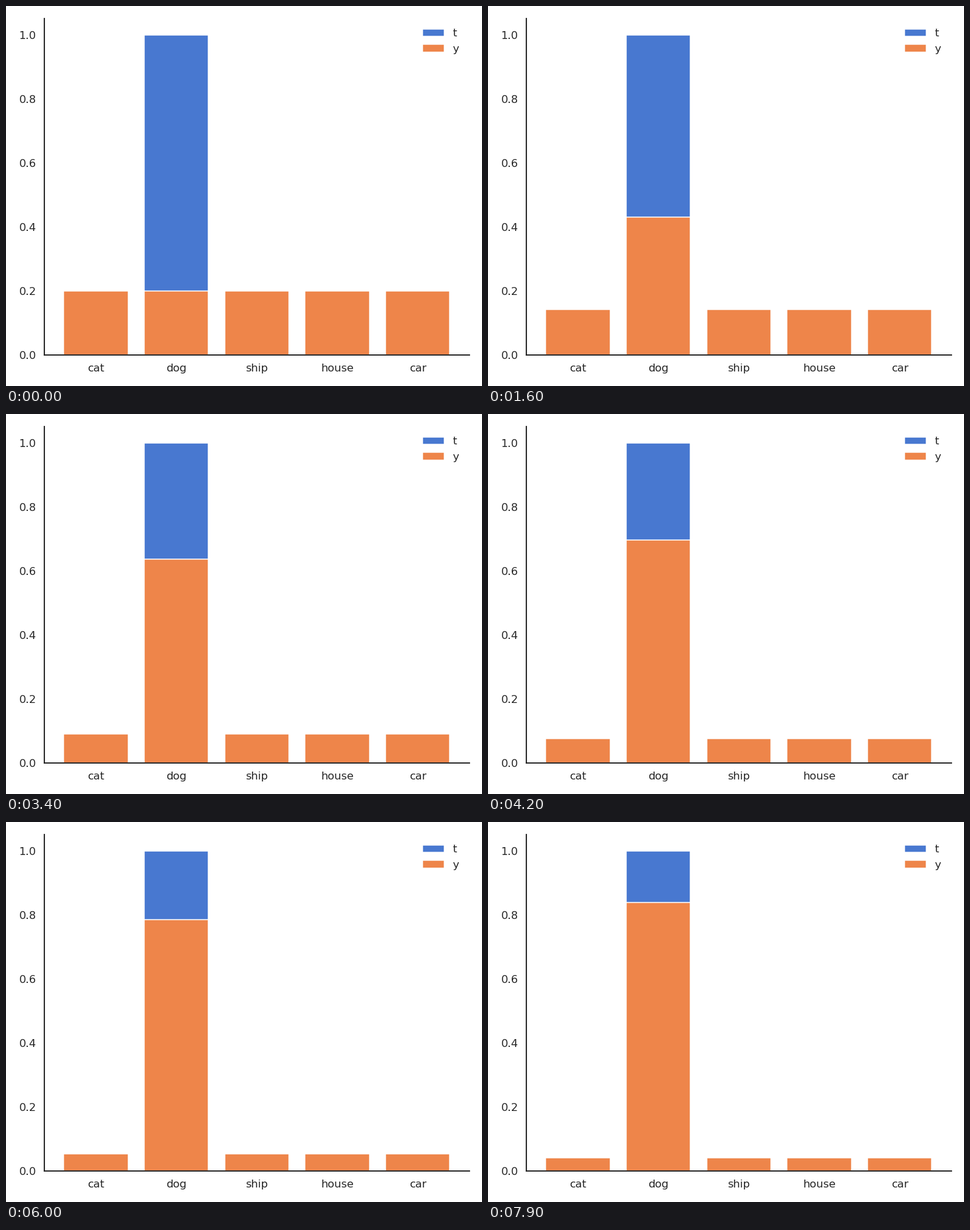
Recreate the animation shown at these times as a matplotlib script. Size 720 px wide and 576 px high, loop 8 s.

```python
import numpy as np
import matplotlib.pyplot as plt
from matplotlib.animation import FuncAnimation

FRAMES = 80
INTERVAL = 100
RATE = 0.08

SCALE = 1.5
LABEL_SIZE = 16.49  # just under 16.5, so hinting rounds glyph heights down
DARK = "0.15"
BLUE, ORANGE = "#4878d0", "#ee854a"

plt.rcParams.update({
    "font.family": "DejaVu Sans",
    "font.size": 12 * SCALE,
    "xtick.labelsize": LABEL_SIZE,
    "ytick.labelsize": LABEL_SIZE,
    "legend.fontsize": LABEL_SIZE,
    "legend.frameon": False,
    "axes.linewidth": 1.25 * SCALE,
    "axes.edgecolor": DARK,
    "text.color": DARK,
    "xtick.color": DARK,
    "ytick.color": DARK,
    "xtick.bottom": False,
    "ytick.left": False,
    "xtick.major.size": 6 * SCALE,
    "ytick.major.size": 6 * SCALE,
    "axes.spines.top": False,
    "axes.spines.right": False,
    "patch.linewidth": SCALE,
    "patch.edgecolor": "white",
    "patch.force_edgecolor": True,
})

labels = ["cat", "dog", "ship", "house", "car"]
target = np.array([0, 1, 0, 0, 0])


def softmax(z):
    e = np.exp(z - z.max())
    return e / e.sum()


def descend(steps):
    """Class probabilities at each cross-entropy gradient step."""
    z = np.zeros(len(target))
    history = []
    for _ in range(steps):
        y = softmax(z)
        history.append(y)
        z = z - RATE * (y - target)
    return history


history = descend(FRAMES)

fig, ax = plt.subplots(figsize=(10, 8), dpi=72)
ax.bar(labels, target, color=BLUE, label="t")
bars = ax.bar(labels, history[0], color=ORANGE, label="y")
ax.set_ylim(0, 1.05)
ax.legend(loc="upper right")
fig.tight_layout()


def update(i):
    for bar, p in zip(bars, history[i]):
        bar.set_height(p)
    return list(bars)


anim = FuncAnimation(fig, update, frames=FRAMES, interval=INTERVAL,
                     repeat=True, repeat_delay=0)
plt.show()
```
